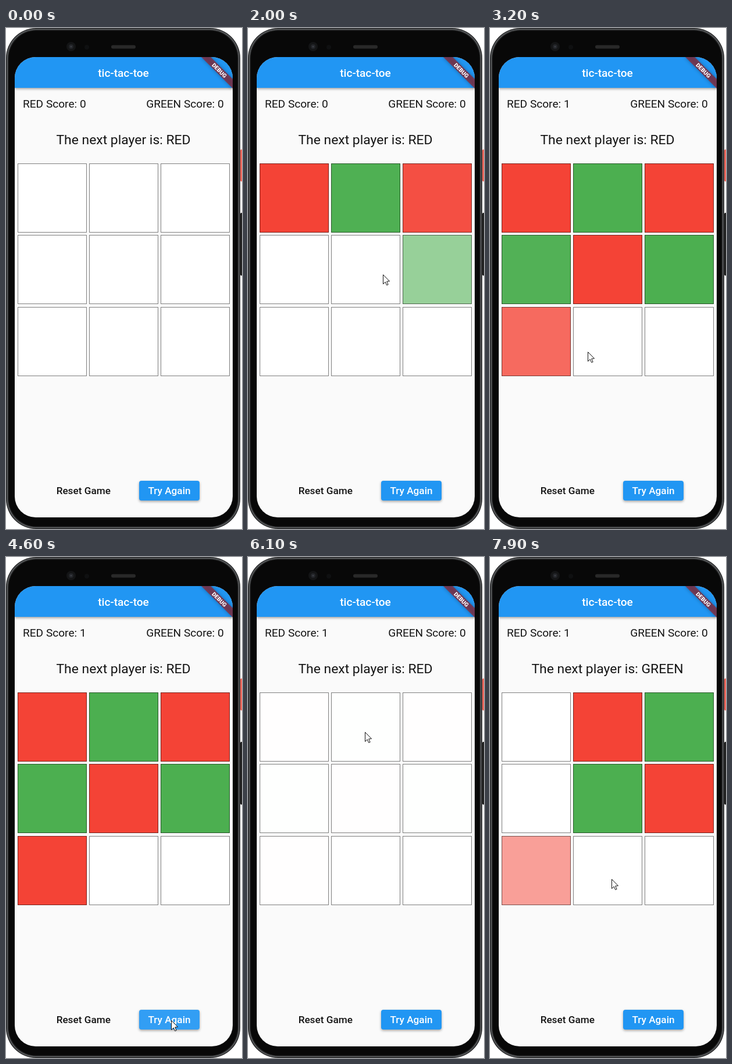
These frames come from a looping animation (406x862 px, 8 s). An HTML page with a canvas:

```html
<!DOCTYPE html>
<html lang="en">
<head>
<meta charset="utf-8">
<title>tic-tac-toe</title>
<style>
html, body { margin: 0; width: 100%; height: 100%; overflow: hidden; background: #fff; }
canvas { display: block; width: 406px; height: 862px; }
</style>
</head>
<body>
<canvas id="stage" width="406" height="862"></canvas>
<script>
const ctx = document.getElementById('stage').getContext('2d');
const LOOP = 8000, FADE = 1000, RESET = 5235, CELL = 119;
const RED = '244,67,54', GREEN = '76,175,80', BLUE = '#2196f3';

// Cells in the order they are taken, and when; red opens each round
const rounds = [
  { cells: [0, 1, 2, 5, 4, 3, 6], times: [900, 1265, 1410, 1750, 2210, 2530, 2795] },
  { cells: [1, 2, 5, 4, 6], times: [6160, 1420 + 5000, 6692, 7050, 7690] }
];
const WIN = rounds[0].times[6];

const clamp = v => Math.max(0, Math.min(1, v));
const easeOut = v => 1 - Math.pow(1 - clamp(v), 3);
const smooth = v => v * v * (3 - 2 * v);
const cellPos = i => [20 + (i % 3) * 123, Math.floor(233 + Math.floor(i / 3) * 123.5)];

// The pointer rests on each cell around its click, then visits the button
function visits({ cells, times }) {
  return cells.flatMap((cell, i) => {
    const [x, y] = cellPos(cell);
    return [-100, 30].map(d => ({ t: times[i] + d, x: x + 58, y: y + 68 }));
  });
}
const path = [
  ...visits(rounds[0]),
  { t: 3200, x: 168, y: 557 },
  { t: 4500, x: 284, y: 797 },
  { t: RESET, x: 284, y: 797 },
  { t: 5500, x: 271, y: 481 },
  ...visits(rounds[1]),
  { t: 7900, x: 209, y: 554 }
];

function box(x, y, w, h, r, fill) {
  ctx.beginPath();
  ctx.roundRect(x, y, w, h, r);
  ctx.fillStyle = fill;
  ctx.fill();
}

function dot(x, y, r, fill) {
  ctx.beginPath();
  ctx.arc(x, y, r, 0, 7);
  ctx.fillStyle = fill;
  ctx.fill();
}

function text(str, x, y, size, { weight = 400, color = '#141414', align = 'left' } = {}) {
  ctx.font = `${weight} ${size}px Roboto, sans-serif`;
  ctx.textAlign = align;
  ctx.fillStyle = color;
  ctx.fillText(str, x, y);
}

function shadow(color, blur, dy) {
  ctx.shadowColor = color;
  ctx.shadowBlur = blur;
  ctx.shadowOffsetY = dy;
}

function drawPhone() {
  ctx.fillStyle = '#fff';
  ctx.fillRect(0, 0, 406, 862);
  // Nested outlines from the rim to the bezel
  ['#222324', '#606264', '#2a2b2c', '#080808'].forEach((fill, i) => {
    const inset = i * 1.5;
    box(inset, inset, 403 - 2 * inset, 862 - 2 * inset, 52 - inset, fill);
  });
  box(403, 209, 6, 55, [2, 0, 0, 2], '#ee6a5f');
  box(403, 318, 6, 108, [2, 0, 0, 2], '#222');
  dot(112, 32, 8, '#141516');
  dot(112, 32, 4, '#232529');
  dot(112, 32, 1.5, '#3c3f45');
  dot(139, 33, 4, '#0f1011');
  box(181, 29.5, 42, 6, 3, '#292929');
}

function drawBanner() {
  ctx.save();
  ctx.translate(390, 50);
  ctx.rotate(Math.PI / 4);
  ctx.scale(0.955, 0.955);
  ctx.save();
  shadow('rgba(0,0,0,.5)', 6, 0);
  ctx.fillStyle = 'rgba(160,24,28,.63)';
  ctx.fillRect(-40, 28, 80, 12);
  ctx.restore();
  text('DEBUG', 0, 37.6, 10.2, { weight: 900, color: '#fff', align: 'center' });
  ctx.restore();
}

function drawCells(t) {
  const fills = [];
  rounds.forEach(({ cells, times }, round) => {
    const left = round === 0 ? 1 - easeOut((t - RESET) / FADE) : 1;
    cells.forEach((cell, i) => {
      const alpha = easeOut((t - times[i]) / FADE) * left;
      if (alpha > 0) fills[cell] = `rgba(${i % 2 ? GREEN : RED},${alpha})`;
    });
  });
  ctx.lineWidth = 1;
  ctx.strokeStyle = 'rgba(0,0,0,.5)';
  for (let i = 0; i < 9; i++) {
    const [x, y] = cellPos(i);
    for (const fill of ['#fff', fills[i] || 'transparent']) {
      ctx.fillStyle = fill;
      ctx.fillRect(x, y, CELL, CELL);
    }
    ctx.strokeRect(x + 0.5, y + 0.5, CELL - 1, CELL - 1);
  }
}

function nextPlayer(t) {
  const { times } = rounds[t < RESET ? 0 : 1];
  const played = times.filter(at => at <= t && at !== WIN).length;
  return played % 2 ? 'GREEN' : 'RED';
}

function drawButtons(t) {
  text('Reset Game', 133.3, 802, 17.2, { weight: 500, align: 'center' });
  ctx.save();
  shadow('rgba(0,0,0,.35)', 4, 2);
  box(229, 779, 104, 34, 4, BLUE);
  ctx.restore();
  const hover = clamp((t - 4400) / 150) * clamp((5650 - t) / 250);
  box(229, 779, 104, 34, 4, `rgba(255,255,255,${0.08 * hover})`);
  text('Try Again', 281, 802, 17.2, { weight: 500, align: 'center', color: '#fff' });
}

function drawScreen(t) {
  ctx.save();
  box(15, 50, 375, 792, 36, '#fafafa');
  ctx.clip();
  ctx.save();
  shadow('rgba(0,0,0,.35)', 4, 1.5);
  ctx.fillStyle = BLUE;
  ctx.fillRect(15, 50, 375, 53);
  ctx.restore();
  text('tic-tac-toe', 202, 84, 19.1, { weight: 500, color: '#fff', align: 'center' });
  drawBanner();
  text(`RED Score: ${t >= WIN ? 1 : 0}`, 29, 136.5, 19.1);
  text('GREEN Score: 0', 374.7, 136.5, 19.1, { align: 'right' });
  text(`The next player is: ${nextPlayer(t)}`, 202, 200, 22.92, { align: 'center' });
  drawCells(t);
  drawButtons(t);
  ctx.restore();
}

function drawPointer(t) {
  if (t < path[0].t) return;
  const i = path.findLastIndex(p => p.t <= t);
  const a = path[i], b = path[i + 1] || a;
  const k = a === b ? 0 : smooth((t - a.t) / (b.t - a.t));
  ctx.save();
  ctx.translate(Math.round(a.x + (b.x - a.x) * k) + 0.5, Math.round(a.y + (b.y - a.y) * k) + 0.5);
  ctx.fillStyle = '#fff';
  ctx.strokeStyle = '#111';
  ctx.lineWidth = 1;
  const arrow = new Path2D('M0 0V16L3.7 12.5L6.2 18L8.6 17L6.2 11.5L11 11.2Z');
  ctx.fill(arrow);
  ctx.stroke(arrow);
  ctx.restore();
}

const begin = performance.now();

function frame() {
  const t = (performance.now() - begin) % LOOP;
  drawPhone();
  drawScreen(t);
  drawPointer(t);
  requestAnimationFrame(frame);
}

frame();
</script>
</body>
</html>
```
